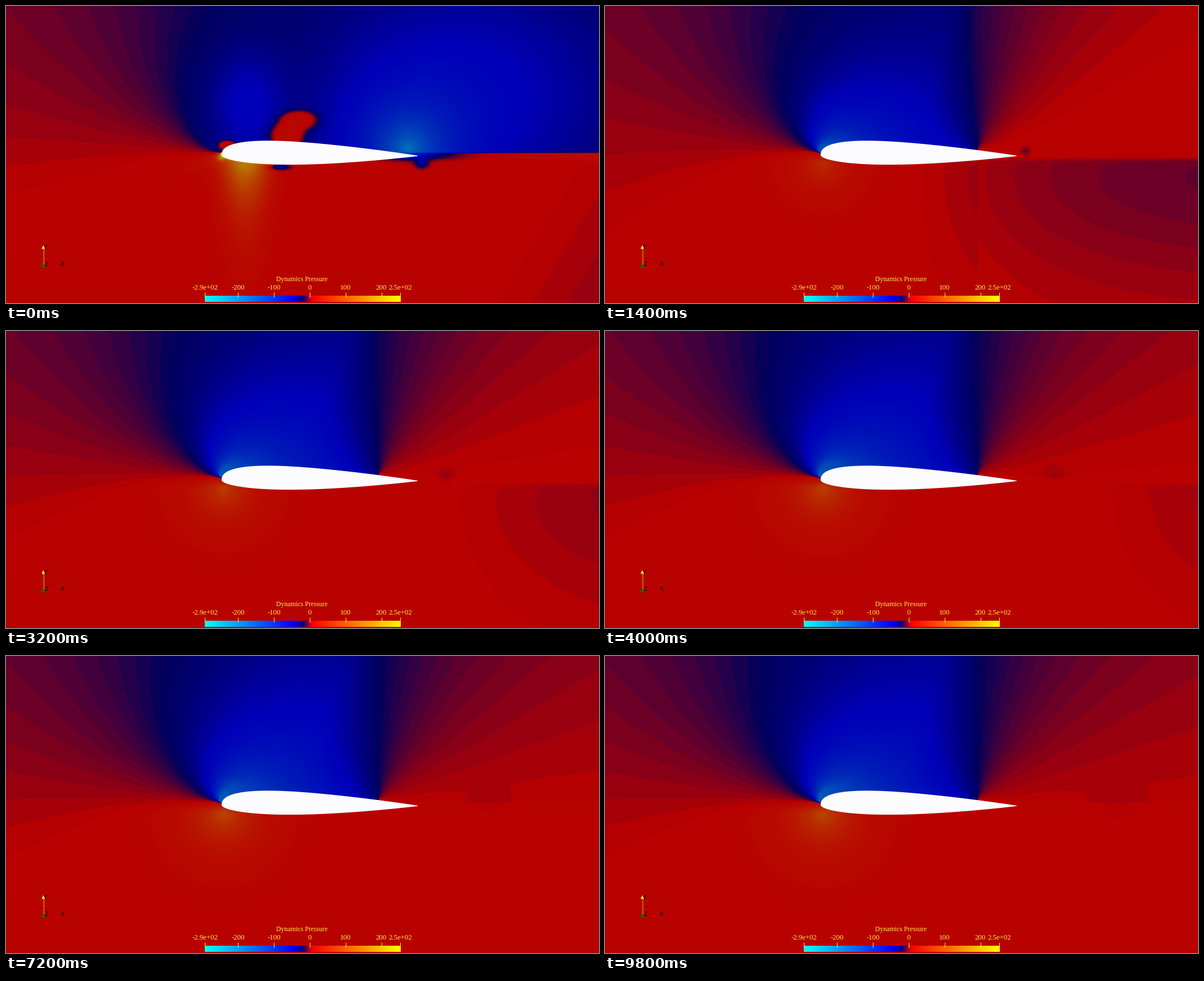
A matplotlib script that plays this animation: 1056 px wide and 530 px high, repeating every 10 s.

```python
import numpy as np
import matplotlib.pyplot as plt
from matplotlib.animation import FuncAnimation
from matplotlib.colors import LinearSegmentedColormap
from matplotlib.patches import Circle, Polygon

W, H, FRAMES, INTERVAL = 1056, 530, 50, 200
P_MIN, P_MAX = -293, 253
SETTLED = 7    # frame at which the start-up flow has washed out
SHADE = 0.725  # surface lighting darkens the colour map
YELLOW = "#fbee45"
NOSE, TAIL = 384, 733
X, Y = np.meshgrid(np.arange(1, W, 2.0), np.arange(1, H, 2.0))


def sigmoid(z):
    return 0.5 + 0.5 * np.tanh(z / 2)


def gauss(x, y, sx, sy):
    return np.exp(-((X - x) / sx) ** 2 - ((Y - y) / sy) ** 2)


def peak(x, y, reach):
    return np.exp(-np.hypot(X - x, Y - y) / reach)


def mix(a, b, t):
    return a + (b - a) * t


def soft_max(a, b, softness=2):
    return softness * np.logaddexp(a / softness, b / softness)


def nose_fan():
    """Angle around the nose, in units of a fan that opens with distance."""
    dx, dy = NOSE - X, 262 - Y
    spread = 23 * (np.hypot(dx, dy) / 40) ** 0.6
    return (np.degrees(np.arctan2(dy, dx)) - 6) / spread


def tail_fan():
    """Angle in right angles (-1 to 3) and distance around the recovery point."""
    dx, dy = X - 664, 255 - Y
    angle = (np.degrees(np.arctan2(dy, dx)) + 90) % 360 - 90
    return angle / 90, np.hypot(dx, dy)


FAN = nose_fan()
TURN, REACH = tail_fan()
ahead = np.clip(TURN, -1, 1)
behind = np.maximum(TURN - 1, 0)
RECOVERY = (6.5 - 15 * ahead - 11.5 * ahead ** 3
            - behind * (55 * REACH / (REACH + 35) + 12 * (REACH / 100) ** 2))
BELOW_WAKE = sigmoid((Y - 272) / 2.5) / (1 + ((Y - 305) / 210) ** 2)


def startup_field():
    upper = soft_max(2 - 21 * FAN, np.full_like(FAN, -23))
    upper -= 28 * gauss(428, 180, 62, 95) + 28 * gauss(830, 150, 260, 200)
    upper -= 175 * peak(716, 255, 55)
    red_cap = gauss(522, 203, 31, 16) + gauss(500, 232, 29, 21)
    upper = mix(upper, 15, sigmoid((red_cap - 0.36) * 9))
    upper = mix(upper, 18, sigmoid((gauss(394, 249, 17, 10) - 0.45) * 10))

    plume = np.exp(-((X - 426) / 38) ** 2 - np.maximum(Y - 282, 0) / 62)
    lower = 10 + 165 * plume + 200 * gauss(383, 268, 6, 6)
    lower -= 0.035 * np.maximum(X + 0.6 * Y - 1130, 0)
    lower -= 65 * gauss(485, 287, 19, 6) + 55 * gauss(740, 280, 12, 9)

    left = np.maximum(380 - X, 0)
    wake_y = 272 + 0.25 * left + 0.012 * np.maximum(X - TAIL, 0)
    return mix(upper, lower, sigmoid((Y - wake_y) / (3 + 0.12 * left)))


STARTUP = startup_field()


def pressure(k):
    age = max(k - SETTLED, 0)
    young = np.exp(-age / 10)

    # suction fanning out from the nose, recovering towards the tail
    front = np.minimum(2 - (26 - 6 * young) * FAN, 10)
    rear = np.minimum(RECOVERY + 7 * young * REACH / (REACH + 60), 10)
    field = soft_max(front, rear)
    field += (100 - 40 * young) * peak(388, 280, 42 - 8 * young) * sigmoid((Y - 270) / 4)

    # low-pressure wake carried downstream
    wake = np.tanh(np.maximum(X - 520 - 22 * age, 0) / 330)
    field -= (10 + 8 * young) * wake * BELOW_WAKE

    # shed vortex drifts and spreads
    size = 9 + 1.1 * age
    field -= (3.5 + 12 * np.exp(-age / 6)) * gauss(
        749 + 3.9 * age, 259 + 0.7 * max(age - 18, 0), size, 4 + 0.55 * size)

    return mix(field, STARTUP, max(1 - k / SETTLED, 0) ** 2.5)


def cold_and_hot(scale):
    stops = (0, 0.45, 0.5, 0.55, 1)
    colors = [(0, 1, 1), (0, 0, 1), (0, 0, 0.5), (1, 0, 0), (1, 1, 0)]
    nodes = [(s, tuple(scale * c for c in rgb)) for s, rgb in zip(stops, colors)]
    return LinearSegmentedColormap.from_list("cold_hot", nodes, N=256)


def foil_outline():
    t = np.linspace(0, 1, 120) ** 2

    def thickness(s):
        return 10 * (0.2969 * np.sqrt(s) - 0.126 * s - 0.3516 * s**2
                     + 0.2843 * s**3 - 0.1015 * s**4)

    x, chord = NOSE + (TAIL - NOSE) * t, 266 + 1.5 * t
    upper = chord - 26 * thickness(t ** 0.85)
    lower = chord + 16.7 * thickness(t ** 1.1)
    return np.vstack([np.column_stack([x, upper]), np.column_stack([x, lower])[::-1]])


fig = plt.figure(figsize=(W / 100, H / 100), dpi=100)
ax = fig.add_axes([0, 0, 1, 1])
ax.set_axis_off()


def label(x, y, text, px, color=YELLOW, font="Liberation Serif"):
    ax.text(x, y, text, fontsize=px * 0.72, color=color, family=font,
            ha="center", va="baseline", zorder=5)


def line(xs, ys, color, px=1):
    ax.plot(xs, ys, color=color, lw=px * 0.72, solid_capstyle="butt", zorder=4)


def patch(shape, color):
    shape.set(facecolor=color, edgecolor="none", zorder=4)
    ax.add_patch(shape)


image = ax.imshow(pressure(0), cmap=cold_and_hot(SHADE), vmin=P_MIN, vmax=P_MAX,
                  extent=(0, W, H, 0), interpolation="bilinear",
                  interpolation_stage="data", aspect="auto")
patch(Polygon(foil_outline()), "#fcfcfe")

# colour bar
ax.imshow(np.linspace(0, 1, 256)[None], cmap=cold_and_hot(1), extent=(354, 702.5, 528, 517),
          interpolation="nearest", aspect="auto", zorder=3)
label(527, 491, "Dynamics Pressure", 11.9)
ticks = {P_MIN: "-2.9e+02", P_MAX: "2.5e+02"}
ticks.update({v: str(v) for v in range(-200, 201, 100)})
for value, text in ticks.items():
    x = 541 + 0.638 * value
    label(x, 505.5, text, 12.9)
    line([x, x], [511, 520], YELLOW)

# orientation axes
line([70, 97], [463.5, 463.5], "#d00000")
line([66.5, 66.5], [463, 433], "#c8b428")
patch(Polygon([(66.5, 426.5), (63.5, 433.5), (69.5, 433.5)]), "#f4f020")
patch(Circle((66.5, 464), 3), "#087008")
for x, y, name in [(100.5, 464, "X"), (70.5, 434.5, "Y"), (72, 463.5, "Z")]:
    label(x, y, name, 11, "black", "Liberation Sans")

ax.set_xlim(0, W)
ax.set_ylim(H, 0)


def update(k):
    image.set_data(pressure(k))
    return [image]


anim = FuncAnimation(fig, update, frames=FRAMES, interval=INTERVAL, repeat=True)
plt.show()
```
